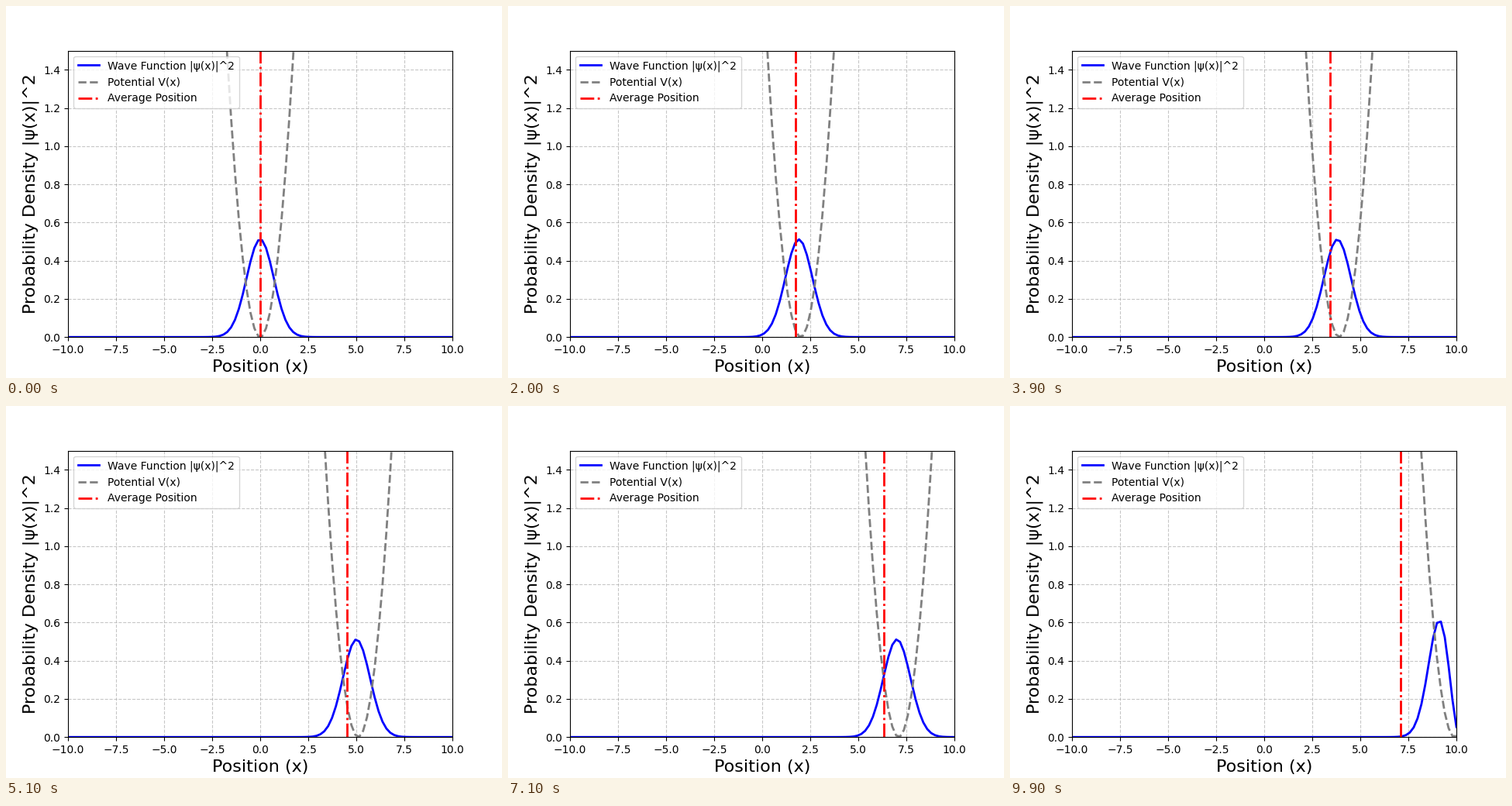
Animation of 640 by 480 pixels, one loop 10000 ms. Source, as a matplotlib script:

```python
import numpy as np
import matplotlib.pyplot as plt
from matplotlib.animation import FuncAnimation

FRAMES = 100
STEP = 0.1   # well displacement per frame
TAU = 0.1    # imaginary time step

x = np.linspace(-10, 10, 100)
dx = x[1] - x[0]
hop = np.full(len(x) - 1, -0.5 / dx**2)
kinetic = np.diag(np.full(len(x), 1 / dx**2)) + np.diag(hop, 1) + np.diag(hop, -1)


def well(center):
    return 0.5 * (x - center) ** 2


def solve(center):
    return np.linalg.eigh(kinetic + np.diag(well(center)))


def density(n):
    """Ground state of the previous well, relaxed briefly in the current one."""
    _, old = solve(STEP * max(n - 1, 0))
    energy, modes = solve(STEP * n)
    psi = old[:, 0] / np.sqrt(dx)
    psi = modes @ (np.exp(-TAU * energy) * (modes.T @ psi))
    return psi**2


fig, ax = plt.subplots(figsize=(6.4, 4.8), dpi=100)
ax.set_xlim(-10, 10)
ax.set_ylim(0, 1.5)
ax.set_xlabel("Position (x)", fontsize=16)
ax.set_ylabel("Probability Density |ψ(x)|^2", fontsize=16)
ax.grid(True, linestyle="--", alpha=0.7)

wave, = ax.plot(x, density(0), color="blue", lw=2, label="Wave Function |ψ(x)|^2")
potential, = ax.plot(x, well(0), color="gray", lw=2, ls="--", label="Potential V(x)")
average = ax.axvline(0, color="red", lw=2, ls="-.", label="Average Position")
ax.legend(loc="upper left")


def update(n):
    p = density(n)
    mean = np.sum(x * p) * dx
    wave.set_ydata(p)
    potential.set_ydata(well(STEP * n))
    average.set_xdata([mean, mean])
    return wave, potential, average


anim = FuncAnimation(fig, update, frames=FRAMES, interval=100, repeat=True, repeat_delay=0)
plt.show()
```
